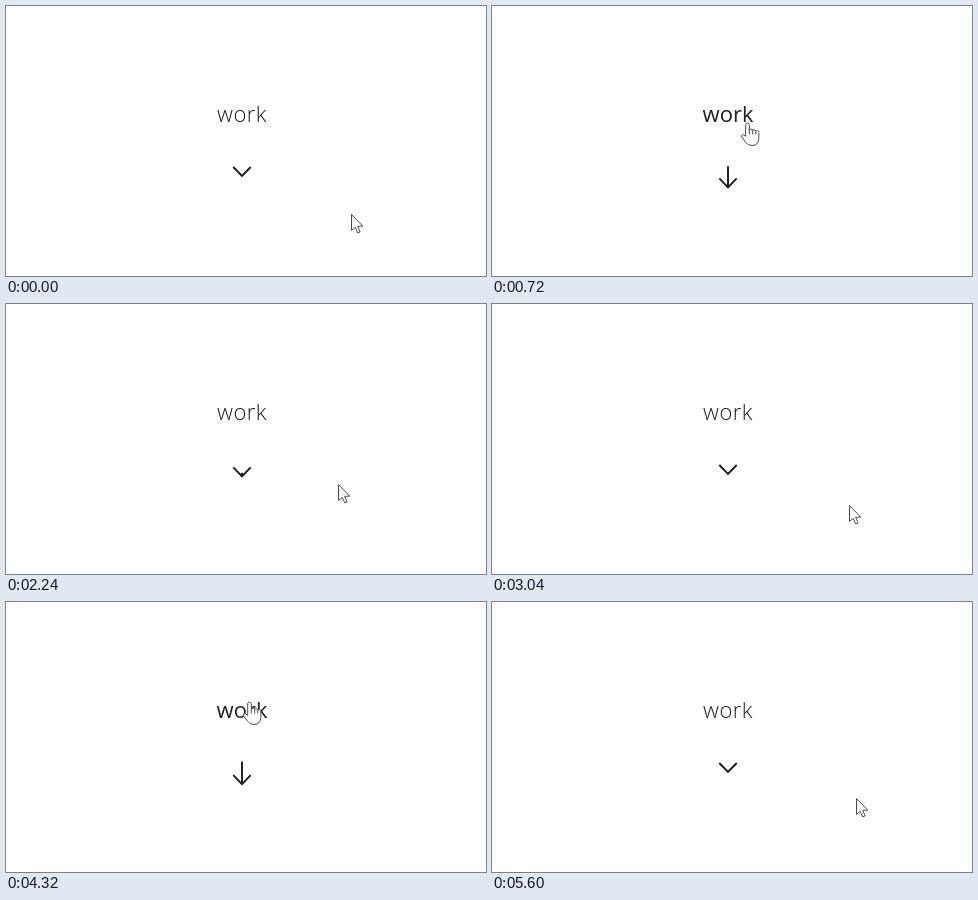
Write an HTML page with a canvas that moves like this. It is 480x270 px and loops after 5.76 s.

```html
<!DOCTYPE html>
<html lang="en">
<head>
<meta charset="utf-8">
<title>Hover arrow</title>
<style>
  html, body { margin: 0; width: 100%; height: 100%; overflow: hidden; background: #fff; }
  canvas { display: block; width: 480px; height: 270px; }
</style>
</head>
<body>
<canvas id="stage" width="480" height="270"></canvas>
<script>
const ctx = document.getElementById("stage").getContext("2d");
const LOOP = 5760, TICK = 80, FADE = 500;

const smooth = u => u * u * (3 - 2 * u);
const easeIn = u => u * u;
const easeOut = u => u * (2 - u);

// CSS "ease": cubic-bezier(.25, .1, .25, 1)
function cssEase(x) {
  if (x <= 0) return 0;
  if (x >= 1) return 1;
  const bezier = (a, b, s) => 3 * a * s * (1 - s) ** 2 + 3 * b * s * s * (1 - s) + s ** 3;
  let lo = 0, hi = 1;
  for (let i = 0; i < 24; i++) {
    const mid = (lo + hi) / 2;
    if (bezier(0.25, 0.25, mid) < x) lo = mid; else hi = mid;
  }
  return bezier(0.1, 1, lo);
}

// Pointer tip: time, x, y, easing used to reach it
const pointerKeys = [
  [30, 345.5, 208.5],
  [660, 254.5, 117, smooth],
  [1120, 259.5, 119, easeOut],
  [1760, 259.5, 119, smooth],
  [2480, 357.5, 201.5, smooth],
  [3680, 357.5, 201.5, smooth],
  [4320, 243.5, 100, smooth],
  [4960, 243.5, 100, smooth],
  [5200, 286.5, 124.5, easeIn],
  [5600, 364.5, 196.5, easeOut]
];
const hovers = [[510, 1960], [4090, 5075]];

function pointerAt(t) {
  const next = pointerKeys.findIndex(key => key[0] > t);
  if (next === 0) return pointerKeys[0].slice(1, 3);
  if (next < 0) return pointerKeys[pointerKeys.length - 1].slice(1, 3);
  const [t0, x0, y0] = pointerKeys[next - 1];
  const [t1, x1, y1, ease] = pointerKeys[next];
  const u = ease((t - t0) / (t1 - t0));
  return [x0 + (x1 - x0) * u, y0 + (y1 - y0) * u];
}

const hovering = t => hovers.some(([enter, leave]) => t >= enter && t < leave);
const growth = t => hovers.reduce((sum, [enter, leave]) =>
  sum + cssEase((t - enter) / FADE) - cssEase((t - leave) / FADE), 0);

const arrowCursor = new Path2D("M0 0V16L3.7 12.8L6.2 18.4L8.6 17.4L6.2 11.8L11.3 11.6Z");
const handCursor = new Path2D(
  "M-1.8 12.8V1.2Q-1.8 -.4 0 -.4Q1.8 -.4 1.8 1.2V7Q2 5.4 3.5 5.6Q5.2 5.7 5.2 7.2" +
  "Q5.4 6 6.8 6.2Q8.3 6.4 8.3 7.9Q8.6 6.9 9.8 7.1Q11.3 7.4 11.3 9V15Q11 22 4.5 22" +
  "Q0 22 -2 18.5L-5.8 13.5Q-6.5 11.6 -5 11.2Q-3.8 11 -1.8 12.8Z" +
  "M1.8 7V11M5.2 7.2V11M8.3 7.9V11");

function drawLabel(active) {
  ctx.font = `${active ? 400 : 300} 22px "Open Sans", sans-serif`;
  ctx.letterSpacing = active ? "0px" : "0.5px";
  ctx.textAlign = "center";
  ctx.fillStyle = active ? "#222" : "#1c1c1c";
  ctx.fillText("work", 236, 116);
}

function drawArrow(p) {
  const tip = 170 + 16 * p;
  ctx.strokeStyle = "#1a1a1a";
  ctx.lineWidth = 1.9;
  ctx.lineJoin = "miter";
  ctx.beginPath();
  ctx.moveTo(227.3, tip - 9);
  ctx.lineTo(236, tip);
  ctx.lineTo(244.7, tip - 9);
  if (p > 0.01) {
    ctx.moveTo(236, 171 - 15 * p);
    ctx.lineTo(236, tip);
  }
  ctx.stroke();
}

function drawPointer(t, active) {
  const shape = active ? handCursor : arrowCursor;
  const [x, y] = pointerAt(t);
  ctx.save();
  ctx.translate(Math.floor(x) + 0.5, Math.floor(y) + 0.5);
  ctx.fillStyle = "#fff";
  ctx.strokeStyle = "#4a4a4a";
  ctx.lineWidth = 1;
  ctx.lineJoin = "round";
  ctx.fill(shape);
  ctx.stroke(shape);
  ctx.restore();
}

function render(now) {
  const t = Math.floor((now % LOOP) / TICK) * TICK;
  const active = hovering(t);
  ctx.fillStyle = "#fff";
  ctx.fillRect(0, 0, 480, 270);
  drawLabel(active);
  drawArrow(growth(t));
  drawPointer(t, active);
}

let start;
function frame(now) {
  start ??= now;
  render(now - start);
  requestAnimationFrame(frame);
}
render(0);
requestAnimationFrame(frame);
</script>
</body>
</html>
```
